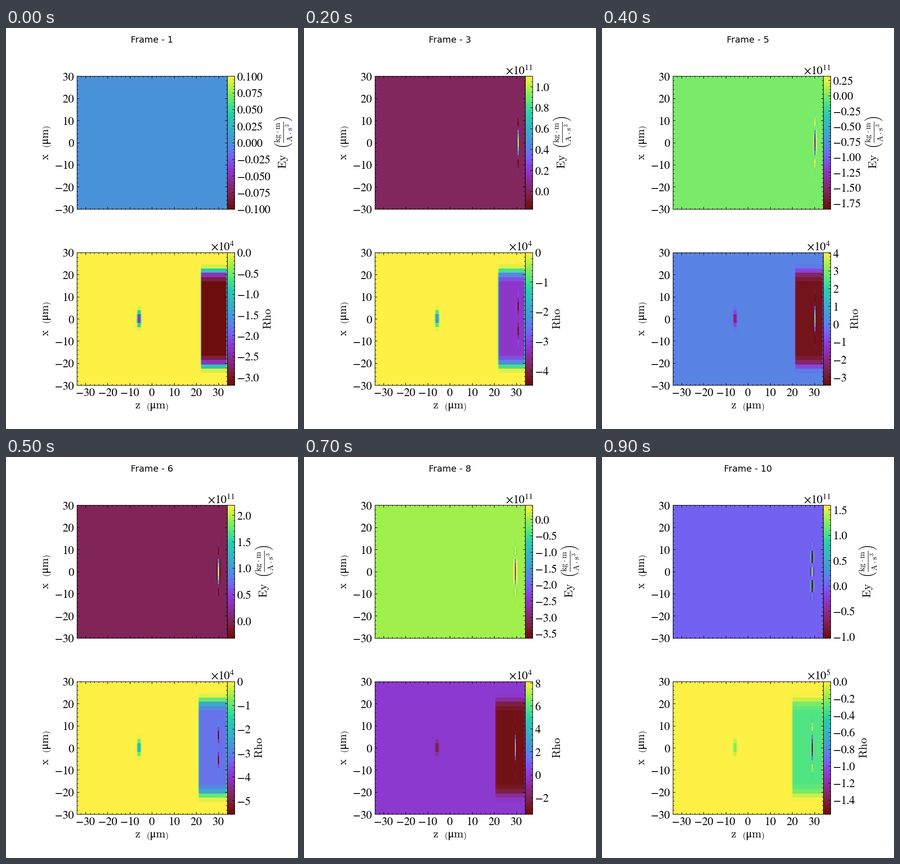
Write a matplotlib script that moves like this. It is 639 by 877 pixels and loops after 1 s.

```python
import numpy as np
import matplotlib.pyplot as plt
from matplotlib.animation import FuncAnimation
from matplotlib.colors import LinearSegmentedColormap
from matplotlib.ticker import AutoMinorLocator, FuncFormatter, MultipleLocator

W, H, DPI = 639, 877, 100
FRAMES, INTERVAL = 10, 100
LEFT, WIDTH, HEIGHT = 154.7, 329.3, 290.4
TOPS = (105.3, 490.9)
LABEL_SIZE = 18

plt.rcParams["mathtext.fontset"] = "stix"
plt.rcParams["font.family"] = "DejaVu Sans"

STOPS = [
    (0, (110, 13, 13)), (.05, (118, 24, 38)), (.128, (130, 38, 90)),
    (.2, (138, 42, 145)), (.25, (141, 50, 184)), (.3, (140, 58, 210)),
    (.395, (115, 100, 242)), (.463, (89, 132, 229)), (.5, (74, 146, 219)),
    (.586, (60, 171, 203)), (.717, (41, 207, 172)), (.796, (80, 228, 132)),
    (.835, (110, 235, 112)), (.86, (125, 236, 104)), (.897, (163, 240, 75)),
    (1, (254, 240, 68)),
]
CMAP = LinearSegmentedColormap.from_list(
    "rainbow_tree", [(p, np.array(c) / 255) for p, c in STOPS], N=256)

# Colour scale per step: low, high, tick step, decimals, power of ten
EY_SCALE = [
    (-.1, .1, .025, 3, 0), (-6.98, 1.37, 1, 0, 10), (-.17, 1.1, .2, 1, 11),
    (-4.77, 3.37, 1, 0, 10), (-1.852, .315, .25, 2, 11),
    (-.32, 2.19, .5, 1, 11), (-9.2, 8.4, 2.5, 1, 10),
    (-3.64, .434, .5, 1, 11), (-.5, 3.85, .5, 1, 11), (-1.03, 1.59, .5, 1, 11),
]
RHO_SCALE = [
    (-3.2, 0, .5, 1, 4), (-3.42, 1.36, 1, 0, 4), (-4.5, 0, 1, 0, 4),
    (-5.18, 0, 1, 0, 4), (-3.46, 4.03, 1, 0, 4), (-5.58, 0, 1, 0, 4),
    (-9.2, 0, 2, 0, 4), (-3.47, 8.14, 2, 0, 4), (-7.7, 0, 1, 0, 4),
    (-1.57, 0, .2, 1, 5),
]
EY_AMP = [0, 7, 11, 13, 18.5, 22, 27, 36.4, 38.5, 40]      # in 1e10
RHO_AMP = [0, 4.6, 3, 2, 7.3, 5.2, 6, 11.6, 10, 12.5]      # in 1e4
EY_PHASE = (1.25, np.pi, 0)
RHO_PHASE = (np.pi, 0, np.pi / 2)

NX, NZ = 32, 256
DX, DZ = 60 / NX, 68 / NZ
x = (np.arange(NX) + .5)[:, None] * DX - 30
z = (np.arange(NZ) + .5)[None, :] * DZ - 34
row = np.floor(np.abs(x) / DX).astype(int)


def by_row(start, values):
    """Values for consecutive rows counted outwards from the axis."""
    profile = np.zeros(NX)
    profile[start:start + len(values)] = values
    return profile[row]


SLAB_X = np.where(row < 9, 1, by_row(9, [.91, .74, .31, .05]))
BUNCH = by_row(0, [2.35, .95, .16]) * np.exp(-((z + 5.95) / .8) ** 4)


def pulse(i, phase, length, wavelength):
    dz = z - (30.85 - .25 * (i - 1))
    envelope = np.exp(-(x / 7.4) ** 2 - (dz / length) ** 2)
    return envelope * np.cos(2 * np.pi * dz / wavelength + phase + .035 * x ** 2)


def symmetric_pulse(i, phase, length):
    dz = z - (30.85 - .25 * (i - 1))
    carrier = np.cos(phase + .035 * x ** 2) * np.cos(2 * np.pi * dz / 1.6)
    return np.exp(-(x / 7.4) ** 2 - (dz / length) ** 2) * carrier


def ey_field(i):
    return EY_AMP[i] * symmetric_pulse(i, EY_PHASE[i % 3], .3 + .065 * max(i - 1, 0))


def rho_field(i):
    edge = 22.05 - DZ * max(i - 1, 0)
    slab_z = np.clip((z - edge + .35) / .6, 0, 1) * np.where(z > 33.6, .5, 1)
    wave = RHO_AMP[i] * symmetric_pulse(i, RHO_PHASE[i % 3], .38)
    return -3.2 * SLAB_X * slab_z - BUNCH + wave


def pixel_axes(left, top, width, height):
    return fig.add_axes([left / W, 1 - (top + height) / H, width / W, height / H])


def math_label(setter, text):
    setter(text, fontsize=LABEL_SIZE).set_math_fontfamily("cm")


def number_format(decimals):
    return FuncFormatter(lambda v, _: f"${round(v, decimals) + 0.0:.{decimals}f}$")


class Panel:
    def __init__(self, top, field, scales, unit_power, label, bottom):
        self.field, self.scales, self.unit_power = field, scales, unit_power
        ax = pixel_axes(LEFT, top, WIDTH, HEIGHT)
        self.image = ax.imshow(np.zeros((NX, NZ)), cmap=CMAP, origin="lower",
                               extent=(-34, 34, -30, 30), aspect="auto",
                               interpolation="nearest")
        for axis in (ax.xaxis, ax.yaxis):
            axis.set_major_locator(MultipleLocator(10))
            axis.set_minor_locator(AutoMinorLocator())
            axis.set_major_formatter(number_format(0))
        ax.tick_params(which="both", direction="in", top=True, right=True,
                       labelbottom=bottom, labelsize=LABEL_SIZE)
        math_label(ax.set_ylabel, r"$\rm{x\ \ \left(μm\right)}$")
        if bottom:
            math_label(ax.set_xlabel, r"$\rm{z\ \ \left(μm\right)}$")

        self.bar = bar = pixel_axes(LEFT + WIDTH, top, 16, HEIGHT)
        bar.imshow(np.linspace(0, 1, 256)[:, None], cmap=CMAP, origin="lower",
                   extent=(0, 1, 0, 1), transform=bar.transAxes, aspect="auto")
        bar.set_xlim(0, 1)
        bar.set_xticks([])
        bar.yaxis.tick_right()
        bar.yaxis.set_label_position("right")
        bar.tick_params(which="both", direction="in", labelsize=LABEL_SIZE)
        math_label(bar.set_ylabel, label)
        self.power = fig.text((LEFT + WIDTH + 16) / W, 1 - (top - 4.2) / H, "",
                              ha="right", va="baseline", fontsize=LABEL_SIZE)

    def show(self, i):
        low, high, step, decimals, power = self.scales[i]
        factor = 10.0 ** (self.unit_power - power) if power else 1
        self.image.set_data(self.field(i) * factor)
        self.image.set_clim(low, high)
        self.bar.set_ylim(low, high)
        axis = self.bar.yaxis
        axis.set_major_locator(MultipleLocator(step))
        axis.set_minor_locator(AutoMinorLocator())
        axis.set_major_formatter(number_format(decimals))
        self.power.set_text(rf"$\times10^{{{power}}}$" if power else "")


fig = plt.figure(figsize=(W / DPI, H / DPI), dpi=DPI, facecolor="white")
title = fig.text(.5, 1 - 32 / H, "", ha="center", va="baseline", fontsize=14)
EY_LABEL = (r"$\rm{Ey}\ \ \left(\frac{\rm{kg} \cdot \rm{m}}"
            r"{\rm{A} \cdot \rm{s}^{3}}\right)$")
panels = [
    Panel(TOPS[0], ey_field, EY_SCALE, 10, EY_LABEL, False),
    Panel(TOPS[1], rho_field, RHO_SCALE, 4, r"$\rm{Rho}$", True),
]


def update(i):
    title.set_text(f"Frame - {i + 1}")
    for panel in panels:
        panel.show(i)
    return []


anim = FuncAnimation(fig, update, frames=FRAMES, interval=INTERVAL,
                     init_func=lambda: update(0), repeat=True, repeat_delay=0,
                     blit=False)
plt.show()
```
